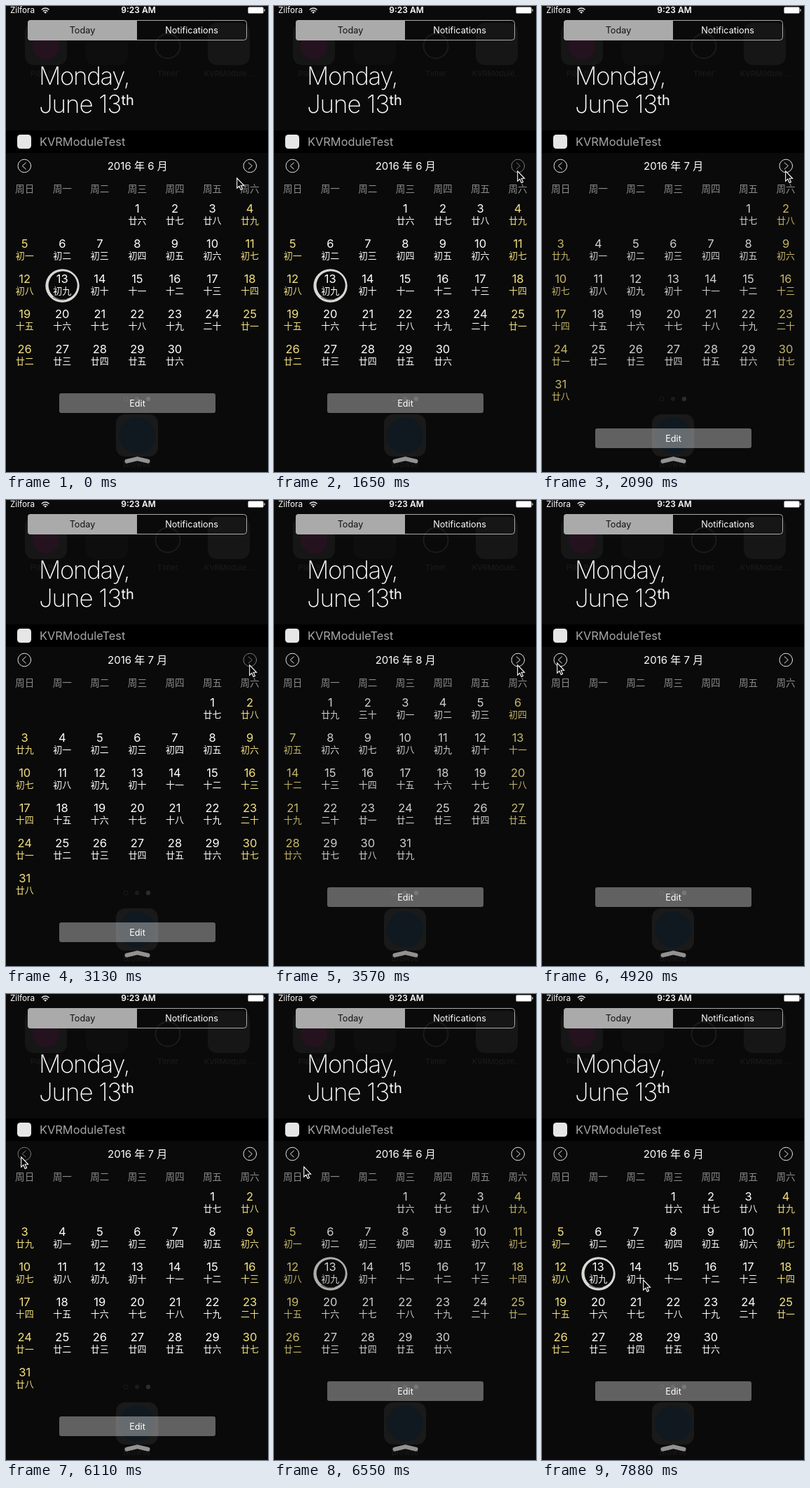
These frames come from a looping animation (374x663 px, 8000 ms). An HTML page:

```html
<!DOCTYPE html>
<html lang="zh-CN">
<head>
<meta charset="utf-8">
<title>Calendar widget</title>
<style>
html, body { margin: 0; width: 100%; height: 100%; overflow: hidden; background: #0a0a0a; }
svg { display: block; width: 100%; height: 100%; }
text { font-family: Inter, "Noto Sans CJK SC", "Noto Sans CJK", sans-serif; fill: #fff; }
.mid, .day, .lunar, .week, .label { text-anchor: middle; }
.label { font-size: 11px; fill: #1c1c1c; }
.ui { font-size: 12.7px; }
.big { font-size: 35px; font-weight: 200; }
.day { font-size: 16.5px; }
.lunar { font-size: 13px; font-weight: 350; }
.week { font-size: 13.6px; font-weight: 350; fill: #8c8c8c; }
.rest { fill: #f3e080; }
.line { fill: none; stroke: #e4e4e4; stroke-linecap: round; stroke-linejoin: round; }
</style>
</head>
<body>
<svg viewBox="0 0 374 663">
  <!-- dimmed home screen -->
  <g fill="#161616">
    <rect x="27" y="24" width="60" height="60" rx="13"/>
    <rect x="114" y="24" width="60" height="60" rx="13" fill="#0e0e0e"/>
    <rect x="288" y="24" width="60" height="60" rx="13"/>
    <rect x="157" y="581" width="60" height="60" rx="13" fill="#1a1a1a"/>
  </g>
  <circle cx="57" cy="57" r="19" fill="#25121f"/>
  <circle cx="231" cy="57" r="17.5" fill="none" stroke="#1b1b1b" stroke-width="2"/>
  <circle cx="187" cy="611" r="26" fill="#10191f"/>
  <text class="label" x="57" y="100">Play Box</text>
  <text class="label" x="231" y="100">Timer</text>
  <text class="label" x="318" y="100">KVRModule…</text>
  <text class="label" x="187" y="656">Browse</text>
  <circle cx="171" cy="559" r="3" fill="none" stroke="#1a1a1a"/>
  <circle cx="187" cy="559" r="3.2" fill="#1a1a1a"/>
  <circle cx="203" cy="559" r="3.2" fill="#2c2c2c"/>

  <!-- status bar -->
  <text x="6" y="10" font-size="11.7">Zilfora</text>
  <path class="line" d="M51.3 5a7 7 0 0 1 9.8 0M53.3 7.3a4.2 4.2 0 0 1 5.8 0" stroke-width="1.5"/>
  <path d="M54.4 8.9a2.6 2.6 0 0 1 3.6 0L56.2 10.8z" fill="#fff"/>
  <text class="mid" x="189" y="10" font-size="12" font-weight="600">9:23 AM</text>
  <rect x="345.5" y="1.5" width="22" height="9" rx="1.5" fill="#fff"/>
  <path d="M369 4.5v3" stroke="#bbb" stroke-width="1.5"/>

  <!-- tabs and date -->
  <path d="M187 20H35a4 4 0 0 0-4 4v21a4 4 0 0 0 4 4h152z" fill="#aaa"/>
  <rect x="31.5" y="20.5" width="312" height="28" rx="4" fill="none" stroke="#aaa"/>
  <text class="ui mid" x="109" y="39" style="fill:#111">Today</text>
  <text class="ui mid" x="265" y="39">Notifications</text>
  <text class="big" x="47" y="112" letter-spacing="-1.4">Monday,</text>
  <text class="big" x="47" y="152" letter-spacing="-1.1">June 13</text>
  <text x="164.5" y="141" font-size="20">th</text>

  <!-- widget header -->
  <rect y="177" width="374" height="32" fill="#000"/>
  <rect x="16" y="183" width="20" height="20" rx="4.5" fill="#e6e6e6"/>
  <text x="48" y="199" font-size="16.4" style="fill:#a6a6a6">KVRModuleTest</text>
  <g id="prev" class="line">
    <circle cx="26.3" cy="227.5" r="9.3"/><path d="M28.3 223l-5 4.5 5 4.5"/>
  </g>
  <g id="next" class="line">
    <circle cx="348.3" cy="227.5" r="9.3"/><path d="M346.3 223l5 4.5-5 4.5"/>
  </g>
  <text id="title" class="mid" x="187.7" y="233" font-size="15"></text>
  <g id="calendar"></g>

  <g id="edit">
    <rect x="76" width="223" height="28" rx="3" fill="#fff" fill-opacity=".355"/>
    <text class="ui mid" x="187.5" y="19">Edit</text>
  </g>
  <path d="M172.5 647.7l15-3.6 15 3.6" fill="none" stroke="#929292" stroke-width="6"
    stroke-linecap="round" stroke-linejoin="round"/>
  <path id="cursor" d="M.7.8v14.4l3.2-3 2.3 5.3 2.3-1-2.3-5.2h4.4z" fill="#000" stroke="#fff" stroke-width="1.1"/>
</svg>
<script>
const $ = id => document.getElementById(id);
const LOOP = 8000, TICK = 148.5, DAY = 864e5, YEAR = 2016;
const LUNAR_START = Date.UTC(YEAR, 5, 5), LUNAR_MONTH = 29.4;

// all times below are in ticks
const taps = [{ at: 11, month: 7 }, { at: 21, month: 8 }, { at: 32, month: 7 }, { at: 41, month: 6 }];
const glides = [
  { from: 4, to: 9, x: 347, y: 234 },
  { from: 24, to: 31, x: 21, y: 231 },
  { from: 43, to: 44, x: 42, y: 245 },
  { from: 44, to: 51, x: 35, y: 239 },
  { from: 51, to: 53, x: 144, y: 406 },
];

const columnX = c => 26.7 + 53.57 * c;
const text = (cls, x, y, s) => `<text class="${cls}" x="${x}" y="${y}">${s}</text>`;
const firstColumn = m => new Date(YEAR, m - 1, 1).getDay();
const dayCount = m => new Date(YEAR, m, 0).getDate();
const rowCount = m => Math.ceil((firstColumn(m) + dayCount(m)) / 7);

// lunar months begin at the rounded multiples of LUNAR_MONTH
function lunar(m, d) {
  const days = (Date.UTC(YEAR, m - 1, d) - LUNAR_START) / DAY;
  const k = Math.ceil((days + .5) / LUNAR_MONTH) - 1;
  const n = days - Math.round(k * LUNAR_MONTH) + 1;
  if (n === 20) return '二十';
  if (n === 30) return '三十';
  return '初十廿'[n === 10 ? 0 : Math.floor(n / 10)] + '十一二三四五六七八九'[n % 10];
}

function monthMarkup(m) {
  let out = '';
  for (let d = 1; d <= dayCount(m); d++) {
    const cell = firstColumn(m) + d - 1, col = cell % 7, y = 294 + 50 * Math.floor(cell / 7);
    const rest = col % 6 ? '' : ' rest';
    out += text('day' + rest, columnX(col), y, d) + text('lunar' + rest, columnX(col), y + 16, lunar(m, d));
  }
  if (m === 6) // brushed ring around today
    out += `<path fill="#d8d8d4" fill-rule="evenodd" d="M56.3 398a24.2 23.8 0 1 1 48.4 0a24.2 23.8 0 1 1-48.4 0z
      M60.6 397.4a20.6 20.2 0 1 0 41.2 0a20.6 20.2 0 1 0-41.2 0z"/>
      <path d="M67 414q10 6 20 3" fill="none" stroke="#0a0a0a" stroke-width=".7"/>`;
  return `<g id="m${m}">${out}</g>`;
}

const months = [6, 7, 8];
$('calendar').innerHTML =
  [...'日一二三四五六'].map((c, i) => text('week', columnX(i), 264.5, '周' + c)).join('') +
  months.map(monthMarkup).join('');

// a tap dims its arrow, then clears the grid, then fades the new month in
function calendarAt(tick) {
  let old = 6, month = 6, age = 9;
  for (const tap of taps) if (tick >= tap.at) {
    old = month;
    month = tap.month;
    age = tick - tap.at;
  }
  return {
    month: age < 1 ? old : month,
    rows: rowCount(age < 3 ? old : month),
    alpha: age < 1 ? 1 : age < 3 ? 0 : age < 4 ? .8 : 1,
    pressed: age < 1 ? (month > old ? 'next' : 'prev') : '',
  };
}

function cursorAt(tick) {
  let x = 329, y = 244;
  for (const g of glides) {
    const p = Math.min(1, Math.max(0, (tick - g.from) / (g.to - g.from)));
    const ease = p * p * (3 - 2 * p);
    x += (g.x - x) * ease;
    y += (g.y - y) * ease;
  }
  return [x, y];
}

function draw(now) {
  const tick = Math.floor(now % LOOP / TICK);
  const { month, rows, alpha, pressed } = calendarAt(tick);
  for (const m of months) $('m' + m).setAttribute('opacity', m === month ? alpha : 0);
  for (const id of ['prev', 'next']) $(id).setAttribute('opacity', id === pressed ? .5 : 1);
  $('title').textContent = `${YEAR} 年 ${month} 月`;
  $('edit').setAttribute('transform', `translate(0 ${301 + 50 * rows})`);
  $('cursor').setAttribute('transform', `translate(${cursorAt(tick)})`);
}

const begin = performance.now();
function frame() {
  draw(performance.now() - begin);
  requestAnimationFrame(frame);
}
frame();
</script>
</body>
</html>
```
